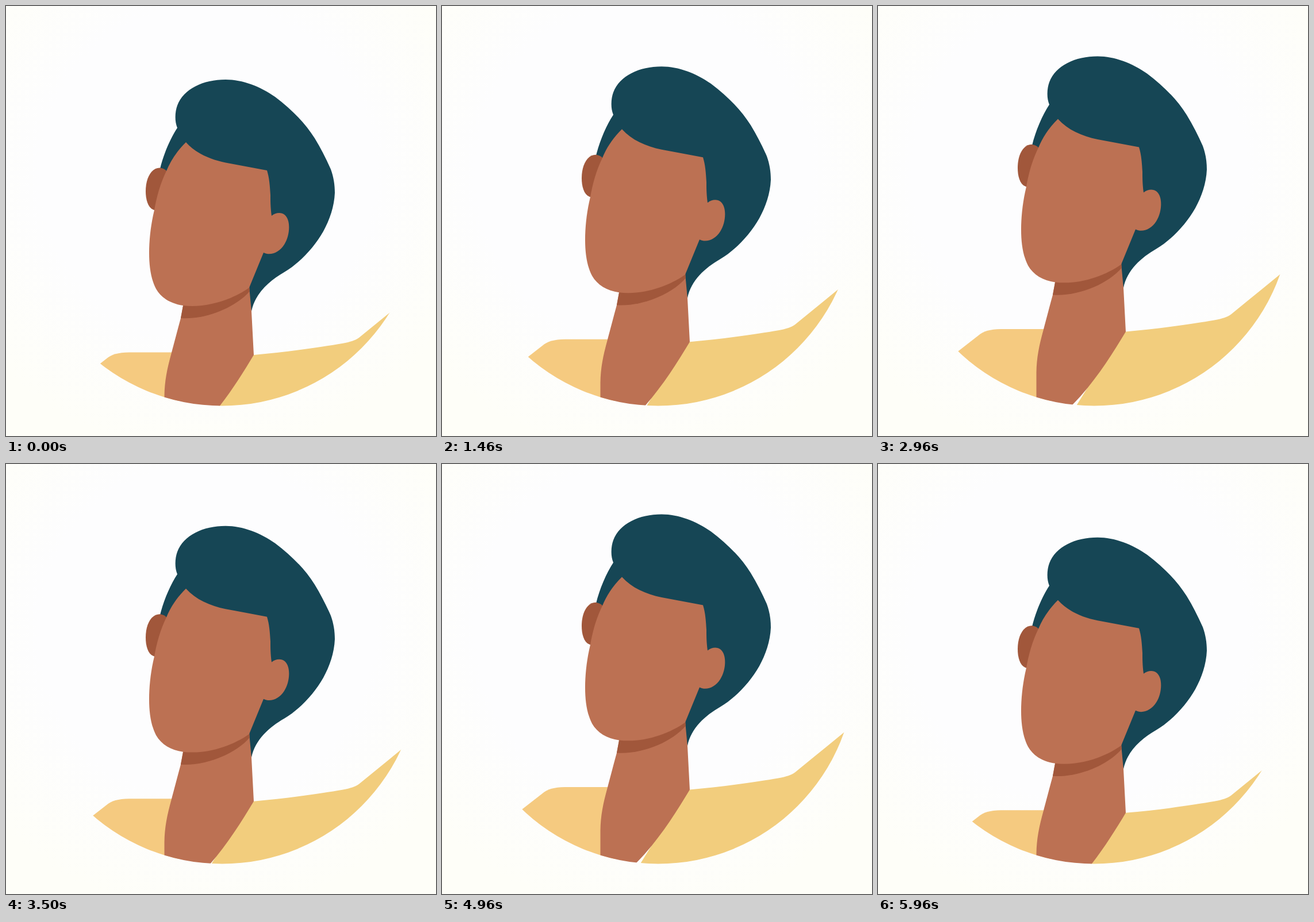
An HTML page for the animation above (6000 ms loop, 748 px wide and 748 px high).

```html
<!DOCTYPE html>
<html lang="en">
<head>
<meta charset="utf-8">
<title>Bobbing portrait</title>
<style>
  html, body { margin: 0; width: 100%; height: 100%; overflow: hidden; background: #fdfdfd; }
  svg { display: block; width: 100%; height: 100%; }
</style>
</head>
<body>
<svg viewBox="0 0 748 748">
  <defs>
    <radialGradient id="paper" gradientUnits="userSpaceOnUse" cx="350" cy="290" r="580">
      <stop offset=".5" stop-color="#fdfdfe"/>
      <stop offset=".85" stop-color="#fefef8"/>
    </radialGradient>
    <!-- Round below, open above so the head can rise out of the badge -->
    <clipPath id="badge">
      <path d="M0 0H748V352.5H719A343 343 0 0 1 33 352.5H0Z"/>
    </clipPath>
  </defs>
  <rect width="748" height="748" fill="url(#paper)"/>
  <g clip-path="url(#badge)">
    <g id="person">
      <path id="hair" fill="#164655" d="M298 212C293 200 294 184 298 173C309 144 343 128 382 128C412 128 442 140 468 158C497 180 520 203 537 230C548 248 557 266 565 284C570 298 572 311 572 325C571 349 563 372 552 392C536 420 511 447 484 463C458 478 433 500 427 531L415 490L290 300L268 283C274 258 286 230 298 212Z"/>
      <path id="shirt-left" fill="#f5ca80" d="M110 664L178 611C188 604 200 602.5 222 602.5H300V760H110Z"/>
      <path id="shirt-right" fill="#f2cd7d" d="M425 607.4L431 607C490 602 550 593 585 587C600 584 607 582 614 577L668 533L740 474V760H330Z"/>
      <path id="neck" fill="#bc7153" d="M309 515L304 543C298 565 292 588 288 603C280 632 276 652 275.5 678V760H312C325 748 340 733 353 718.5C385 682 410 642 431 607L427 531L423 488Z"/>
      <path id="chin-shadow" fill="#a1573b" d="M309 517L304 543C348 546 400 524 424 496L423 486Z"/>
      <path id="far-ear" fill="#a1573b" d="M258 355C247 352 243 337 243 322C243 299 253 281 268 281.5C273 282 277 284 280 288L275 340Z"/>
      <path id="face" fill="#bc7153" d="M313 237C296 254 286 270 279 287C268 310 262 332 258 355C252 380 249 406 249 430C249 452 252 475 261 492C270 508 287 518 308 521C350 526 395 510 423 490L448 429C460 435 475 429 484 415C492 403 494 385 491 374C487 358 472 357 462 365C460 350 460 338 460 329C459 312 458 299 454 286L382 272.5C355 267 330 256 313 237Z"/>
    </g>
  </g>
</svg>
<script>
  const HALF_BOB = 1000;
  const RISE = 40.8;
  const person = document.getElementById("person");

  const smooth = x => x * x * (3 - 2 * x);

  function render(time) {
    const phase = (time / HALF_BOB) % 2;
    const lift = RISE * smooth(phase < 1 ? phase : 2 - phase);
    person.setAttribute("transform", `translate(0 ${-lift})`);
  }

  const start = performance.now();
  function tick() {
    render(performance.now() - start);
    requestAnimationFrame(tick);
  }
  tick();
</script>
</body>
</html>
```
